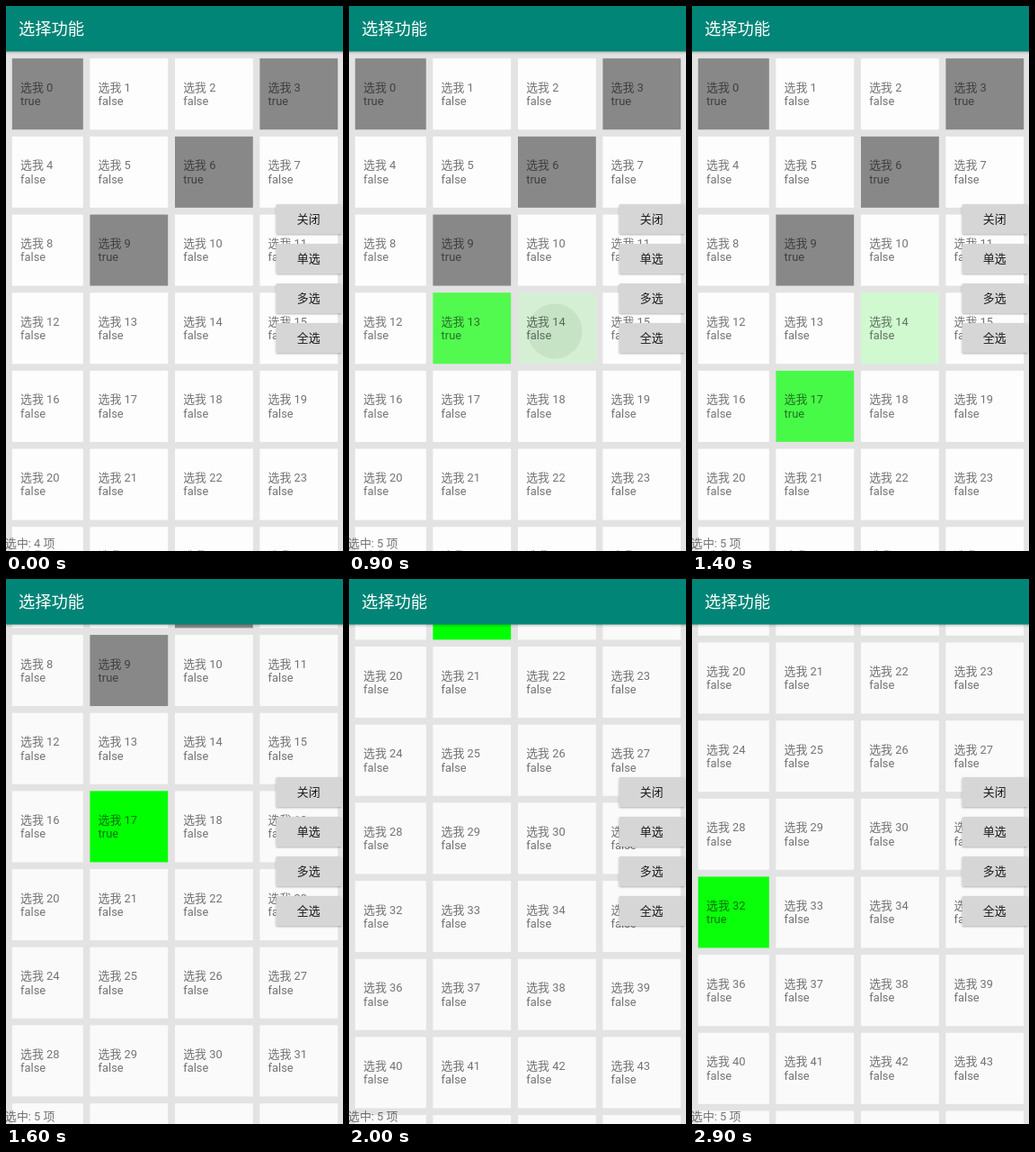
Animation, 375 px wide and 605 px high, one loop 3 s. Source, as an HTML page:

```html
<!DOCTYPE html>
<html lang="zh-CN">
<head>
<meta charset="utf-8">
<title>选择功能</title>
<style>
html, body { margin: 0; width: 100%; height: 100%; overflow: hidden; background: #e3e3e3; }
svg { display: block; width: 375px; height: 605px; }
text { font-family: Roboto, "Noto Sans CJK SC", "Noto Sans CJK", sans-serif; font-size: 12.9px; fill: #000; }
.soft { fill-opacity: .54; }
.title { font-size: 18.3px; fill: #fff; }
.button { text-anchor: middle; fill-opacity: .87; }
</style>
</head>
<body>
<svg id="stage" viewBox="0 0 375 605">
  <defs>
    <linearGradient id="shade" x2="0" y2="1">
      <stop offset="0" stop-color="#000" stop-opacity=".2"/>
      <stop offset="1" stop-color="#000" stop-opacity="0"/>
    </linearGradient>
    <filter id="lift" x="-10%" y="-20%" width="120%" height="150%">
      <feDropShadow dx="0" dy="1" stdDeviation="1" flood-opacity=".3"/>
    </filter>
  </defs>
  <rect width="375" height="605" fill="#e3e3e3"/>
  <g id="grid"></g>
  <rect y="50" width="375" height="4" fill="url(#shade)"/>
  <rect width="375" height="50.5" fill="#008577"/>
  <text class="title" x="14" y="32">选择功能</text>
  <text class="soft" id="status" x="-1" y="601.3"></text>
  <g id="buttons"></g>
</svg>
<script>
const LOOP = 3000, STEP = 100, PITCH = 86.67, TOP = 58.2, SIZE = 79;
const COLS = [[6.8, 79], [93.4, 86.8], [188, 86.8], [282.4, 86.8]];
const PRESET = [0, 3, 6, 9];
// Each tap replaces the previous tapped cell.
const TAPS = [
  { id: 13, at: 400, mid: '#7cf87c', full: '#52fa50', leave: '#d0f9d0' },
  { id: 14, at: 900, mid: '#6cf96a', full: '#50fa50', leave: '#d0f9d0' },
  { id: 17, at: 1300, mid: '#48fa48', full: '#00ff00', leave: '#bcf8bc' },
  { id: 33, at: 2400, mid: '#6cf766', full: '#08ff08', leave: '#d0f9d0' },
  { id: 32, at: 2700, mid: '#6cf766', full: '#0aff0a' }
];
// Scroll offsets for each step from the start of the fling.
const FLING_AT = 1500, FLING = [23, 169.5, 285, 358, 398, 416.5, 421.1];

const $ = id => document.getElementById(id);
function add(parent, tag, attrs, text) {
  const el = document.createElementNS('http://www.w3.org/2000/svg', tag);
  for (const k in attrs) el.setAttribute(k, attrs[k]);
  if (text) el.textContent = text;
  return parent.appendChild(el);
}

const cells = Array.from({ length: 52 }, (_, i) => {
  const [x, width] = COLS[i % 4], y = TOP + Math.floor(i / 4) * PITCH;
  const g = $('grid');
  const box = add(g, 'rect', { x, y, width, height: SIZE });
  const ripple = add(g, 'circle', { cx: x + width / 2 - 2.4, cy: y + 42.8, r: 30.5, fill: '#c6e3c6' });
  add(g, 'text', { class: 'soft', x: x + 9.2, y: y + 36.6 }, '选我 ' + i);
  const label = add(g, 'text', { class: 'soft', x: x + 9.2, y: y + 51.8 });
  return { box, ripple, label };
});

['关闭', '单选', '多选', '全选'].forEach((name, i) => {
  const y = 220 + i * 44;
  add($('buttons'), 'rect', { x: 300.5, y, width: 73, height: 33, rx: 1.5, fill: '#d6d6d6', filter: 'url(#lift)' });
  add($('buttons'), 'text', { class: 'button', x: 336.7, y: y + 20.5 }, name);
});

function scrollAt(t) {
  if (t < FLING_AT) return 0;
  return FLING[Math.min((t - FLING_AT) / STEP, FLING.length - 1)];
}

function cellState(id, t) {
  const off = { fill: t < FLING_AT ? '#fdfdfd' : '#fafafa' };
  if (PRESET.includes(id)) return { fill: '#888', on: true };
  const n = TAPS.findIndex(tap => tap.id === id);
  if (n < 0 || t < TAPS[n].at) return off;
  const tap = TAPS[n], age = t - tap.at;
  const gone = n + 1 < TAPS.length ? t - TAPS[n + 1].at : -1;
  if (gone > STEP) return off;
  if (gone === STEP) return { fill: tap.leave };
  if (age === 0) return { fill: '#d5efd5', press: true };
  return { fill: age === STEP ? tap.mid : tap.full, on: true };
}

function draw(t) {
  $('grid').setAttribute('transform', `translate(0 ${-scrollAt(t)})`);
  const count = PRESET.length + (t > TAPS[0].at ? 1 : 0);
  cells.forEach((c, id) => {
    const s = cellState(id, t);
    c.box.setAttribute('fill', s.fill);
    c.ripple.setAttribute('visibility', s.press ? 'visible' : 'hidden');
    c.label.textContent = s.on ? 'true' : 'false';
  });
  $('status').textContent = `选中: ${count} 项`;
}

let start = null, last = -1;
function tick(now) {
  if (start === null) start = now;
  const t = Math.floor(((now - start) % LOOP) / STEP) * STEP;
  if (t !== last) draw(last = t);
  requestAnimationFrame(tick);
}
draw(0);
requestAnimationFrame(tick);
</script>
</body>
</html>
```
